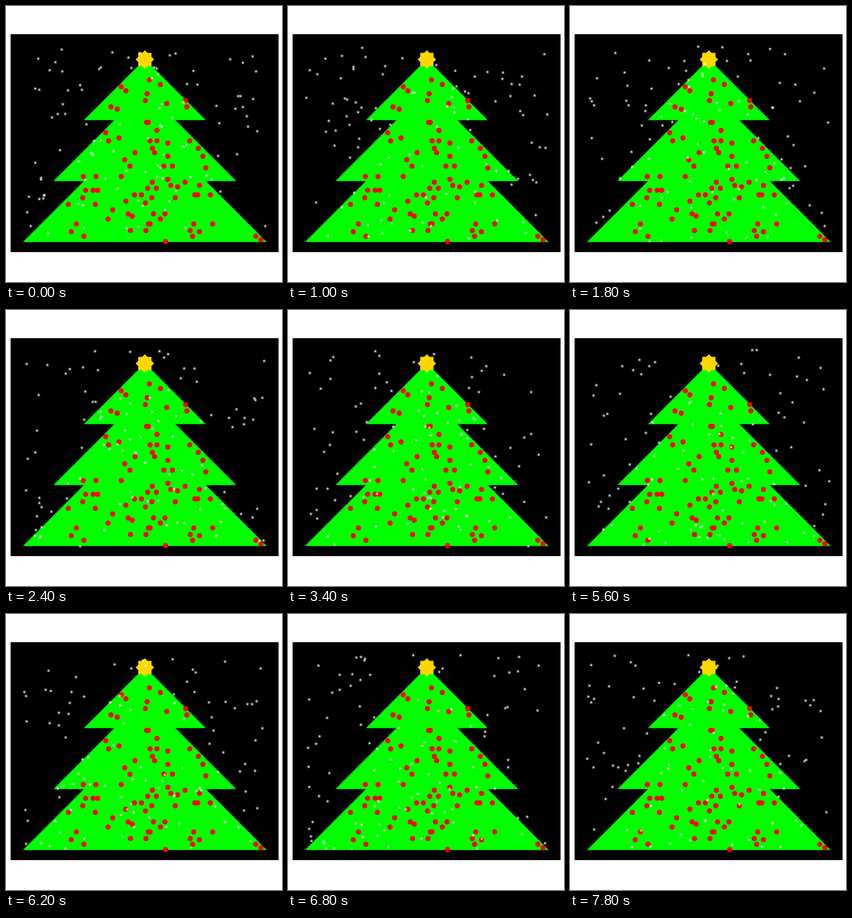
An HTML page with a canvas for the animation above (8000 ms loop, 480 by 480 pixels).

```html
<!DOCTYPE html>
<html lang="en">
<head>
<meta charset="utf-8">
<title>Snowy tree</title>
<style>
  html, body { margin: 0; width: 100%; height: 100%; overflow: hidden; background: #fff; }
  canvas { display: block; }
</style>
</head>
<body>
<canvas id="stage" width="480" height="480"></canvas>
<script>
const ctx = document.getElementById('stage').getContext('2d');
const STEP = 200, STEPS = 40, FLAKES = 100;
const CENTER = 241.5;

// Rows of baubles: y, then the x of each bauble in the row
const ROWS = [
  [128, 249], [136, 268], [140, 200], [147, 208], [152, 245], [164, 242, 312],
  [169, 279], [175, 182, 314], [179, 193],
  [202, 244, 247], [216, 262], [220, 173], [229, 196], [234, 178, 250, 262, 319],
  [238, 281], [247, 254, 334], [254.5, 224, 258], [261, 281, 342], [267, 206],
  [278, 215, 274, 289], [281, 347], [296, 134, 156, 200], [301, 281],
  [306, 254, 311], [311.5, 286, 336], [314, 298], [316.5, 246, 261],
  [320, 138, 151, 159], [328, 223, 235, 328, 333, 355], [333, 133, 253, 294],
  [339, 208], [342, 242], [344.5, 108, 155], [354, 185], [361, 212, 256, 276],
  [365, 219], [370, 177, 268], [378.5, 122, 247, 250, 326, 359],
  [390, 216, 243, 320], [392, 113, 336], [400, 135, 324, 434], [406, 443], [409, 277]
];

function random(seed) {
  return () => {
    seed = (seed + 0x6D2B79F5) | 0;
    let t = Math.imul(seed ^ (seed >>> 15), seed | 1);
    t ^= t + Math.imul(t ^ (t >>> 7), t | 61);
    return ((t ^ (t >>> 14)) >>> 0) / 4294967296;
  };
}

function polygon(color, ...points) {
  ctx.fillStyle = color;
  ctx.beginPath();
  points.forEach(([x, y]) => ctx.lineTo(x, y));
  ctx.fill();
}

function drawTree() {
  for (let tier = 0; tier < 3; tier++) {
    const half = 106 + 53 * tier, base = 198.5 + 106 * tier;
    polygon('#0f0', [CENTER, base - half], [CENTER + half, base], [CENTER - half, base]);
  }
  ctx.fillStyle = '#f00';
  for (const [y, ...row] of ROWS) {
    for (const x of row) {
      ctx.beginPath();
      ctx.arc(x + 0.5, y + 0.5, 4.5, 0, 2 * Math.PI);
      ctx.fill();
    }
  }
}

function drawStar() {
  const y = 93, r = 16;
  ctx.fillStyle = '#ffd700';
  ctx.fillRect(CENTER - 11.5, y - 11.5, 23, 23);
  polygon('#ffd700', [CENTER, y - r], [CENTER + r, y], [CENTER, y + r], [CENTER - r, y]);
}

function drawSnow(step) {
  const next = random(step * 7919 + 17);
  ctx.fillStyle = '#fff';
  ctx.font = '15px "Liberation Sans", Arial, sans-serif';
  ctx.textAlign = 'center';
  ctx.textBaseline = 'alphabetic';
  for (let i = 0; i < FLAKES; i++) {
    const x = 29.5 + 422 * next(), y = 69 + 341 * next();
    ctx.fillText('*', Math.round(x), Math.round(y) + 8);
  }
}

function draw(step) {
  ctx.fillStyle = '#fff';
  ctx.fillRect(0, 0, 480, 480);
  ctx.fillStyle = '#000';
  ctx.fillRect(8, 49, 466, 379);
  drawTree();
  drawStar();
  drawSnow(step);
}

let shown = -1;
const start = performance.now();
function tick() {
  const step = Math.floor((performance.now() - start) / STEP) % STEPS;
  if (step !== shown) draw(shown = step);
  requestAnimationFrame(tick);
}
tick();
</script>
</body>
</html>
```
